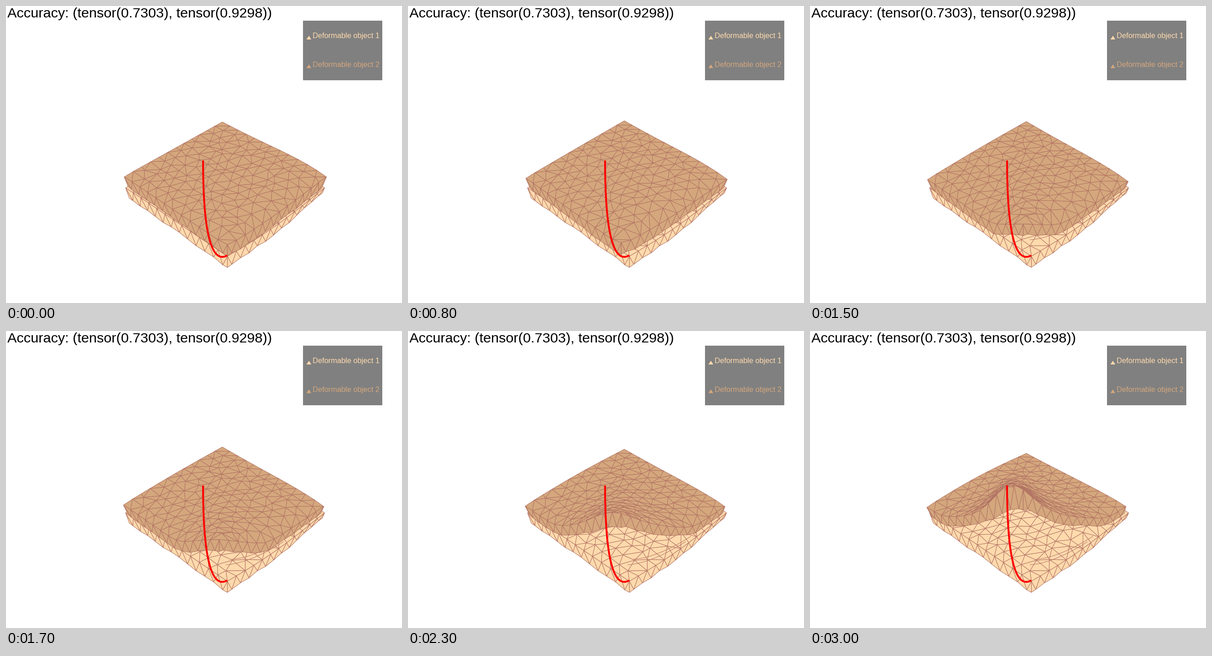
A matplotlib script for the animation above (3100 ms loop, 864 by 648 pixels).

```python
import numpy as np
import matplotlib.pyplot as plt
from matplotlib.animation import FuncAnimation
from matplotlib.collections import PolyCollection
from matplotlib.patches import Polygon, Rectangle
from matplotlib.tri import Triangulation

W, H, DPI = 864, 648, 100
FRAMES, STEP_MS = 31, 100
PEACH, TAN, EDGE = "#ffdaad", "#d4a77d", "#b27464"
N = 13  # vertices along one side of a slab


def grip_path(s):
    """Bezier curve along which the front corner is pulled."""
    s = np.asarray(s, float)[..., None]
    a, b, c, d = np.array([(483, 544), (441, 568), (430, 460), (430, 337)])
    return ((1 - s)**3 * a + 3 * s * (1 - s)**2 * b
            + 3 * s**2 * (1 - s) * c + s**3 * d)


def bell(x, center, width):
    return np.exp(-((x - center) / width) ** 2)


def soft_min(a, b, width=5):
    return -width * np.logaddexp(-a / width, -b / width)


def project(uv, corners):
    """Perspective map of the unit square onto back, left, front, right."""
    rows, rhs = [], []
    for (u, v), (x, y) in zip([(0, 0), (0, 1), (1, 1), (1, 0)], corners):
        rows += [[u, v, 1, 0, 0, 0, -u * x, -v * x],
                 [0, 0, 0, u, v, 1, -u * y, -v * y]]
        rhs += [x, y]
    m = np.append(np.linalg.solve(rows, rhs), 1).reshape(3, 3)
    q = np.column_stack([uv, np.ones(len(uv))]) @ m.T
    return q[:, :2] / q[:, 2:]


class Pose:
    """Outlines of a slab: corners of its top and its lower front edge."""

    def __init__(self, corners, ends, bulge, level=np.inf, hump=0, lift=0,
                 sag=(0, 5)):
        self.corners = np.array(corners, float)
        self.ends = np.array(ends, float)
        self.bulge, self.level, self.hump = bulge, level, hump
        self.lift, self.sag = lift, sag
        left, _, right = self.corners
        tip = self.ends[1]
        self.knots = np.array([left[0], tip[0], right[0]])
        self.heights = [self.ends[0, 1] - left[1], 24, self.ends[2, 1] - right[1]]

    def back(self, x):
        left, rear, right = self.corners
        a = np.clip((rear[0] - x) / (rear[0] - left[0]), 0, 1)
        b = np.clip((x - rear[0]) / (right[0] - rear[0]), 0, 1)
        return (np.interp(x, *self.corners.T) - self.sag[0] * np.sin(np.pi * a)
                - self.sag[1] * np.sin(np.pi * b**2))

    def lower(self, x):
        _, tip, right = self.ends
        b = np.clip((x - tip[0]) / (right[0] - tip[0]), 0, 1)
        rest = np.interp(x, *self.ends.T) + self.bulge * np.sin(np.pi * b)
        if np.isinf(self.level):
            return rest
        return soft_min(rest, self.level - self.hump * bell(x, 458, 65))

    def below(self, x):
        """Point of the lower edge under a point of the upper rim."""
        x_low = np.interp(x, self.knots, self.ends[:, 0])
        return x_low, self.lower(x_low)

    def rim(self, x):
        return (self.below(x)[1] - np.interp(x, self.knots, self.heights)
                - self.lift * bell(x, 431, 45))


class Slab:
    def __init__(self, seed, pose):
        rng = np.random.default_rng(seed)
        step = 1 / (N - 1)
        grid = np.arange(N) * step
        mids = grid[:-1] + step / 2
        out = 1 + step
        edge = [(g, k) for g in grid for k in (0, 1)]
        edge += [(k, g) for g in grid[1:-1] for k in (0, 1)]
        # The outer ring becomes the lower edge of the front walls
        ring = [(0, out), (out, 0), (out, out)]
        ring += [(m, out) for m in mids] + [(out, m) for m in mids]
        inner = [((i + (0.25 if j % 2 else -0.25) + rng.uniform(-0.25, 0.25)) * step,
                  (j + rng.uniform(-0.28, 0.28)) * step)
                 for j in range(1, N - 1) for i in range(1, N - 1)]
        uv = np.array(edge + ring + inner)
        self.tris = Triangulation(uv[:, 0], uv[:, 1]).triangles
        self.ring = uv.max(axis=1) > 1
        self.rough = rng.uniform(-2, 2, len(uv))

        self.start = pose
        left, rear, right = pose.corners
        tip = (pose.ends[1, 0], pose.rim(pose.ends[1, 0]))
        self.x, y = project(np.minimum(uv, 1), [rear, left, tip, right]).T
        top = np.interp(self.x, *pose.corners.T)
        self.depth = np.maximum(pose.rim(self.x) - top, 1)
        self.f = np.clip((y - top) / self.depth, 0, 1)
        self.f[uv.max(axis=1) >= 1] = 1

    def triangles(self, pose):
        f, start = self.f, self.start
        x_back = np.interp(self.x, start.corners[:, 0], pose.corners[:, 0])
        x_rim = np.interp(self.x, start.knots, pose.knots)
        x = x_back + f**2 * (x_rim - x_back)
        top = pose.back(x)
        depth = np.maximum(pose.rim(x) - top, 1)
        # Keep the rear rows in place and crowd the rows near the rim
        k = self.depth / depth
        y = top + depth * k * f / np.sqrt(1 + (k**2 - 1) * f**2)
        x_low, y_low = pose.below(x)
        pts = np.column_stack([np.where(self.ring, x_low, x),
                               np.where(self.ring, y_low + self.rough, y)])
        return pts[self.tris]


def sheet_pose(q):
    """Upper slab at progress q: the front is pulled up, then folds."""
    grip = grip_path(q)
    rise = max(0, 2 * q - 1)
    return Pose(
        corners=[(258 - 3 * q, 372 + 12 * q),
                 (472, 253 - 18 * q + 32 * q**2),
                 (699 - 10 * q, 372 + 10 * min(1, 2 * q))],
        ends=[(266 - q, 393 + 10 * q), (max(grip[0], 465), 548),
              (689 - 3 * q, 397)],
        bulge=5, level=grip[1] + 4 + 85 * rise**2, hump=38 * rise,
        lift=33 * rise**2, sag=(6 * q**2, 5 - 3 * q))


def px(size):
    return size * 72 / DPI


fig = plt.figure(figsize=(W / DPI, H / DPI), dpi=DPI, facecolor="white")
ax = fig.add_axes([0, 0, 1, 1])
ax.set_xlim(0, W)
ax.set_ylim(H, 0)
ax.axis("off")


def label(x, y, text, size, color):
    ax.text(x, y, text, family="Liberation Sans", fontsize=px(size),
            color=color, va="baseline", ha="left")


def mesh(verts, color, z):
    return ax.add_collection(PolyCollection(
        verts, facecolor=color, edgecolor=EDGE, linewidth=px(1),
        joinstyle="round", zorder=z), autolim=False)


label(3, 25, "Accuracy: (tensor(0.7303), tensor(0.9298))", 30.5, "black")
ax.add_patch(Rectangle((648, 32), 173, 130, color="#808080", lw=0))
for row, color in enumerate([PEACH, TAN]):
    y = 70 + 62.5 * row
    ax.add_patch(Polygon([(655.5, y + 3), (661, y - 5), (666, y + 3)],
                         color=color, lw=0, zorder=2))
    label(669, y, f"Deformable object {row + 1}", 16.2, color)

base_pose = Pose(corners=[(261, 396), (472, 277), (695, 396)],
                 ends=[(269, 418), (483, 570), (690, 407)], bulge=8)
mesh(Slab(4, base_pose).triangles(base_pose), PEACH, 1)

# Wrinkles on the lower slab
s = np.linspace(0, 1, 20)
for shift in (0, 12):
    ax.plot(492 - shift + 125 * s, 498 + shift - 50 * s**1.6,
            color=EDGE, lw=px(1), zorder=2)

sheet = Slab(11, sheet_pose(0))
sheet_mesh = mesh(sheet.triangles(sheet_pose(0)), TAN, 3)

ax.plot(*grip_path(np.linspace(0, 1, 80)).T, color="red", lw=px(4),
        solid_capstyle="butt", zorder=4)


def draw(i):
    sheet_mesh.set_verts(sheet.triangles(sheet_pose(i / (FRAMES - 1))))
    return [sheet_mesh]


anim = FuncAnimation(fig, draw, frames=FRAMES, interval=STEP_MS,
                     repeat=True, repeat_delay=0, blit=False)
plt.show()
```
